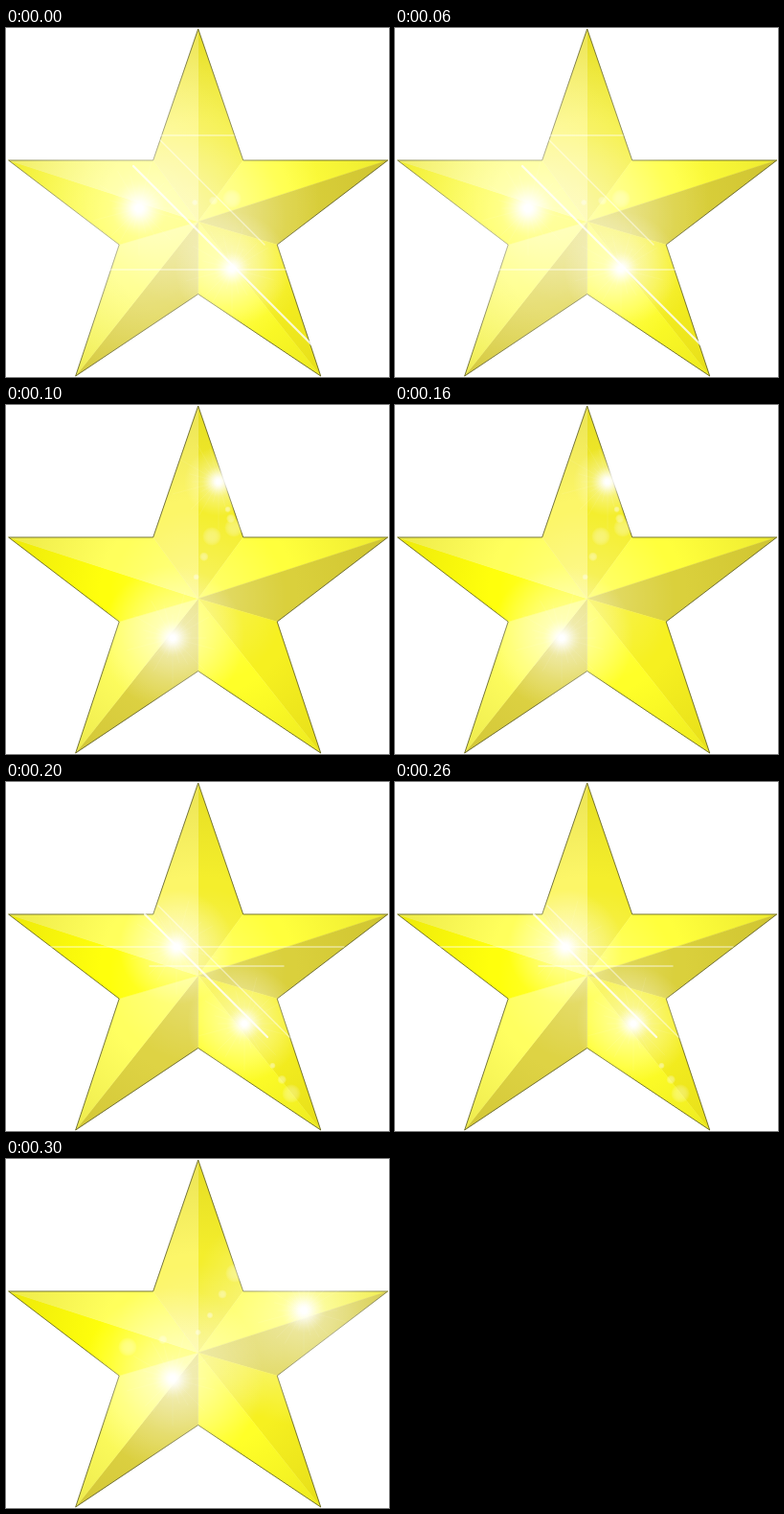
These frames come from a looping animation (400 px wide and 364 px high, 0.4 s). An HTML page:

```html
<!DOCTYPE html>
<html lang="en">
<head>
<meta charset="utf-8">
<title>Sparkling star</title>
<style>
html, body { margin: 0; width: 100%; height: 100%; overflow: hidden; background: #fff; }
svg { display: block; width: 400px; height: 364px; }
</style>
</head>
<body>
<svg id="stage" viewBox="0 0 400 364"><defs></defs></svg>
<script>
const stage = document.getElementById('stage');
const defs = stage.querySelector('defs');
const center = { x: 200.7, y: 202 };
const stepMs = 100;

function add(parent, name, attrs) {
  const node = document.createElementNS('http://www.w3.org/2000/svg', name);
  for (const key in attrs) node.setAttribute(key, attrs[key]);
  parent.append(node);
  return node;
}

function radial(id, stops, attrs = {}) {
  const node = add(defs, 'radialGradient', { id, ...attrs });
  for (const [offset, alpha, color = '#fff'] of stops) {
    add(node, 'stop', { offset, 'stop-color': color, 'stop-opacity': alpha });
  }
  return `url(#${id})`;
}

// White light fading outwards by a formula.
function fade(id, alphaAt) {
  const offsets = Array.from({ length: 9 }, (_, i) => i / 8);
  return radial(id, offsets.map(t => [t, Math.min(1, alphaAt(t))]));
}

// The right half of the outline, mirrored for the left.
const half = [[0, -201], [47, -64], [198, -64], [82.5, 24], [128, 161], [0, 75.5]];
const mirrored = half.slice(1, -1).reverse().map(([x, y]) => [-x, y]);
const rim = [...half, ...mirrored].map(([x, y]) => [center.x + x, center.y + y]);

const facetColors = ['#f4ee2c', '#ffff3c', '#dad03c', '#f6f020', '#ffff28',
                     '#ded344', '#ffff60', '#ffff0c', '#ffff5c', '#fcf668'];
facetColors.forEach((color, i) => add(stage, 'polygon', {
  points: [rim[i], rim[(i + 1) % rim.length], [center.x, center.y]].join(' '),
  fill: color, stroke: color, 'stroke-width': 0.4
}));

const sheen = radial('sheen', [[0, 0.28], [0.45, 0], [0.5, 0, '#a89800'], [1, 0.2, '#a89800']],
  { gradientUnits: 'userSpaceOnUse', cx: center.x, cy: center.y, r: 205 });
add(stage, 'polygon', { points: rim.join(' '), fill: sheen, stroke: '#55552c', 'stroke-width': 0.8 });

const coreFill = fade('core', t => 1.3 * (1 - t) ** 1.5);
const haloFill = fade('halo', t => 0.6 * (1 - t));
const ghostFill = fade('ghost', t => 0.6 * (1 - t ** 3));

// A flare has a core, a halo, rays and, along its axis, a few lens ghosts.
function flare(group, { x, y, halo, aim }) {
  add(group, 'circle', { cx: x, cy: y, r: halo, fill: haloFill });
  add(group, 'circle', { cx: x, cy: y, r: 14 + halo / 12, fill: coreFill });
  for (let i = 0; i < 24; i++) {
    const angle = i * Math.PI / 12;
    const reach = 35 + 15 * Math.sin(i * 2.4);
    add(group, 'line', {
      x1: x, y1: y, x2: x + reach * Math.cos(angle), y2: y + reach * Math.sin(angle),
      stroke: '#fff', 'stroke-width': 0.6, 'stroke-opacity': 0.14
    });
  }
  if (!aim) return;
  for (const t of [0.6, 0.8, 1]) {
    add(group, 'circle', {
      cx: x + (aim.x - x) * t, cy: y + (aim.y - y) * t, r: 3 + 7 * t ** 6,
      fill: ghostFill, opacity: 1.1 - 0.6 * t
    });
  }
}

// Streaks run either level or down at 45 degrees.
function streak(group, { x, y, span, level, width = 1.4, alpha = 0.5 }) {
  add(group, 'line', {
    x1: x, y1: y, x2: x + span, y2: level ? y : y + span,
    stroke: '#fff', 'stroke-width': width, 'stroke-opacity': alpha, 'stroke-linecap': 'round'
  });
}

const scenes = [
  {
    flares: [{ x: 139, y: 188, halo: 190, aim: { x: 236, y: 178 } }, { x: 236, y: 251, halo: 60 }],
    streaks: [{ x: 133, y: 144, span: 187, width: 2.2, alpha: 0.8 }, { x: 161, y: 117, span: 109 },
              { x: 130, y: 112, span: 108, level: true }, { x: 106, y: 252, span: 197, level: true }]
  },
  {
    flares: [{ x: 174, y: 243, halo: 75, aim: { x: 215, y: 137 } },
             { x: 222, y: 80, halo: 36, aim: { x: 238, y: 128 } }]
  },
  {
    flares: [{ x: 178, y: 172, halo: 60 }, { x: 249, y: 252, halo: 60, aim: { x: 298, y: 325 } }],
    streaks: [{ x: 145, y: 138, span: 128, width: 2.2, alpha: 0.8 }, { x: 159, y: 129, span: 137 },
              { x: 46, y: 172, span: 307, level: true }, { x: 150, y: 192, span: 140, level: true }]
  },
  {
    flares: [{ x: 174, y: 229, halo: 95, aim: { x: 239, y: 119 } },
             { x: 311, y: 158, halo: 120, aim: { x: 127, y: 196 } }]
  }
];

const groups = scenes.map(({ flares, streaks = [] }) => {
  const group = add(stage, 'g', { visibility: 'hidden' });
  flares.forEach(item => flare(group, item));
  streaks.forEach(item => streak(group, item));
  return group;
});

const start = performance.now();
function draw() {
  const step = Math.floor((performance.now() - start) / stepMs) % groups.length;
  groups.forEach((group, i) => group.setAttribute('visibility', i === step ? 'visible' : 'hidden'));
  requestAnimationFrame(draw);
}
draw();
</script>
</body>
</html>
```
